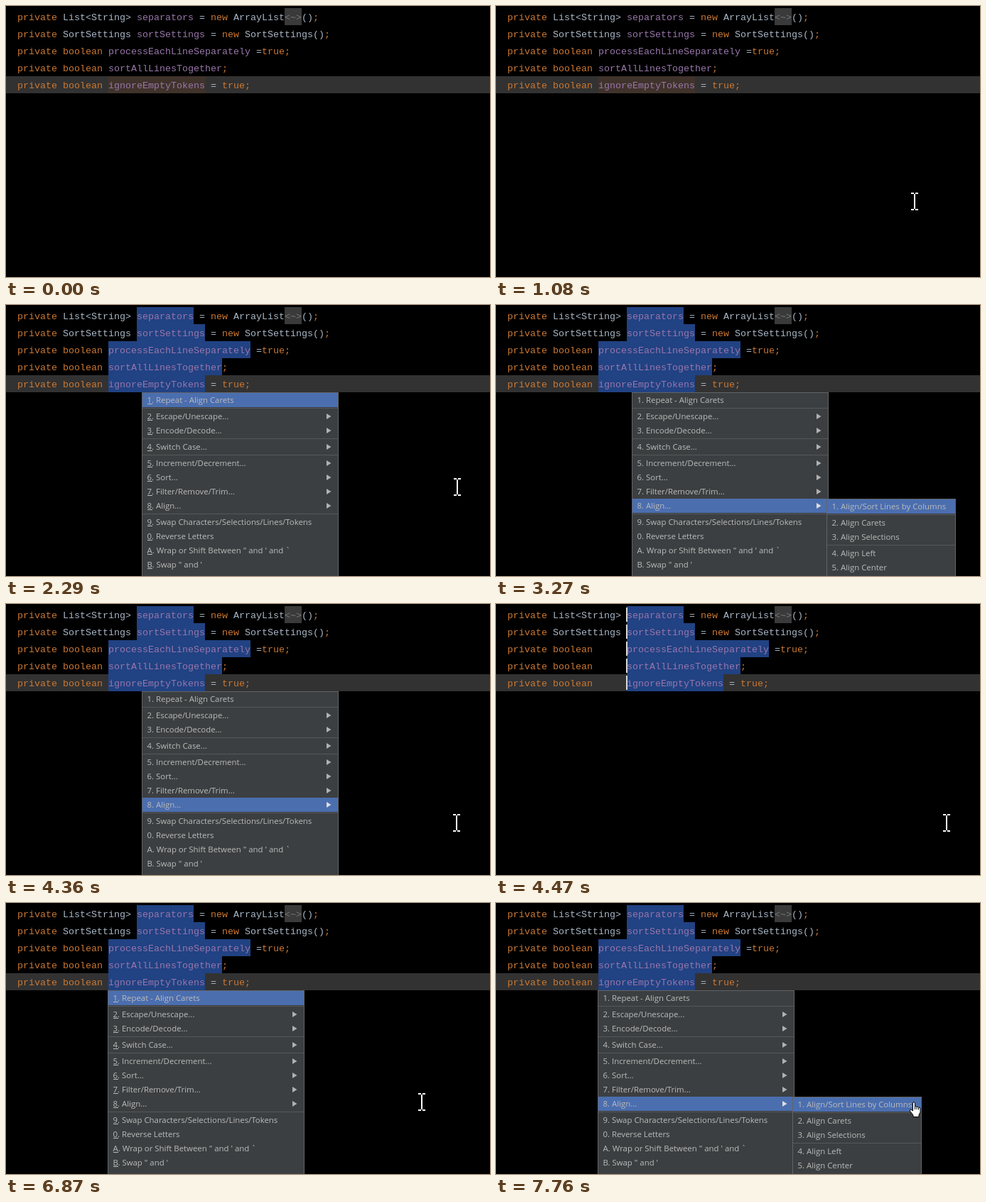
Recreate the animation shown at these times as an HTML page with a canvas. Size 681 px wide and 382 px high, loop 8000 ms.

```html
<!DOCTYPE html>
<html lang="en">
<head>
<meta charset="utf-8">
<title>Align carets</title>
<style>
  html, body { margin: 0; width: 100%; height: 100%; overflow: hidden; background: #000; }
  canvas { display: block; width: 681px; height: 382px; }
</style>
</head>
<body>
<canvas id="stage" width="681" height="382"></canvas>
<script>
const ctx = document.getElementById('stage').getContext('2d');
const LOOP = 8000;
const CHAR = 8, LEFT = 16, ROW = 24, TOP = 3;
const CODE_FONT = '13.333px "Liberation Mono", "Courier New", monospace';
const MENU_FONT = '11.4px "Open Sans", "Noto Sans", sans-serif';
const KEYWORD = '#cc7832', FIELD = '#9876aa', PLAIN = '#a9b7c6', FOLD = '#787878';
const MENU_BG = '#3c3f41', MENU_EDGE = '#616365', MENU_LINE = '#555758', FOCUS = '#4b6eaf';

// Each line: text before the field, the field, text after it
const k = text => [text, KEYWORD];
const p = text => [text, PLAIN];
const lines = [
  { head: [k('private '), p('List<String> ')], field: 'separators',
    tail: [p(' = '), k('new '), p('ArrayList'), ['<~>', FOLD], p('()'), k(';')] },
  { head: [k('private '), p('SortSettings ')], field: 'sortSettings',
    tail: [p(' = '), k('new '), p('SortSettings()'), k(';')] },
  { head: [k('private boolean ')], field: 'processEachLineSeparately',
    tail: [p(' ='), k('true;')] },
  { head: [k('private boolean ')], field: 'sortAllLinesTogether', tail: [k(';')] },
  { head: [k('private boolean ')], field: 'ignoreEmptyTokens',
    tail: [p(' = '), k('true;')] }
];

// '-' is a separator, a trailing '>' marks a submenu
const mainItems = [
  '1. Repeat - Align Carets', '-',
  '2. Escape/Unescape...>', '3. Encode/Decode...>', '-',
  '4. Switch Case...>', '-',
  '5. Increment/Decrement...>', '6. Sort...>', '7. Filter/Remove/Trim...>', '8. Align...>', '-',
  '9. Swap Characters/Selections/Lines/Tokens', '0. Reverse Letters',
  'A. Wrap or Shift Between " and \' and `', 'B. Swap " and \'',
  'C. Switch File Path Separators: Desktop <-> MAIN'
];
const subItems = [
  '1. Align/Sort Lines by Columns', '-',
  '2. Align Carets', '3. Align Selections', '-',
  '4. Align Left', '5. Align Center'
];

// Pointer steps: time, shape, x, y
const pointer = [
  [0, 'none', 0, 0],
  [870, 'beam', 641, 293], [980, 'beam', 606, 282], [1080, 'beam', 589, 276],
  [1620, 'beam', 591, 276],
  [1830, 'beam', 600, 273], [1950, 'beam', 616, 266], [2060, 'beam', 629, 260], [2170, 'beam', 635, 257],
  [3040, 'none', 0, 0],
  [3370, 'hand', 644, 282], [3490, 'hand', 654, 287], [3600, 'hand', 651, 295],
  [3720, 'hand', 641, 304], [3830, 'hand', 634, 309],
  [4360, 'beam', 634, 309], [5020, 'beam', 604, 290], [5120, 'beam', 585, 281],
  [7320, 'none', 0, 0], [7760, 'hand', 585, 281]
];

const within = (t, from, to) => t >= from && t < to;

function box(x, y, w, h, color) {
  ctx.fillStyle = color;
  ctx.fillRect(x, y, w, h);
}

function write(text, x, y, color) {
  ctx.fillStyle = color;
  ctx.fillText(text, x, y);
}

function drawCode(t) {
  const selected = t >= 1310;
  const aligned = within(t, 4470, 5670);
  const midCarets = within(t, 650, 1080) || within(t, 1310, 1830);
  const startCarets = within(t, 4470, 6870);
  ctx.font = CODE_FONT;
  box(0, TOP + 4 * ROW, 681, ROW, '#323232');

  lines.forEach((line, i) => {
    const top = TOP + i * ROW;
    let x = LEFT;
    const run = ([text, color]) => {
      const w = text.length * CHAR;
      if (color === FOLD) box(x, top, w, ROW, '#3a3a3a');
      write(text, x, top + 17, color);
      x += w;
    };
    line.head.forEach(run);
    if (aligned && i > 1) x += 5 * CHAR;
    const start = x, width = line.field.length * CHAR;
    if (selected) box(start, top, width, ROW, '#214283');
    else if (i === 4) box(start, top, width, ROW, '#40332b');
    run([line.field, FIELD]);
    line.tail.forEach(run);
    if (midCarets || startCarets) {
      const caret = startCarets ? start : LEFT + 22 * CHAR;
      box(caret - 1, top + 2, 2, 20, '#d8d8d8');
    }
  });
}

function drawArrow(x, y, color) {
  ctx.fillStyle = color;
  ctx.beginPath();
  ctx.moveTo(x, y - 4);
  ctx.lineTo(x + 6.5, y);
  ctx.lineTo(x, y + 4);
  ctx.fill();
}

function drawMenu(items, x, y, w, focus, underline) {
  box(x, y, w, 400, MENU_EDGE);
  box(x + 1, y + 1, w - 2, 400, MENU_BG);
  ctx.font = MENU_FONT;
  let top = y + 1;
  for (const item of items) {
    if (item === '-') {
      box(x + 1, top + 1, w - 2, 1, MENU_LINE);
      top += 3;
      continue;
    }
    const active = item[0] === focus;
    if (active) box(x + 1, top, w - 2, 20, FOCUS);
    write(item.replace(/>$/, ''), x + 7.5, top + 14, '#bbbbbb');
    if (underline) box(x + 8, top + 15, Math.round(ctx.measureText(item[0]).width), 1, '#bbbbbb');
    if (item.endsWith('>')) drawArrow(x + 260, top + 10, active ? '#dddddd' : '#afb1b3');
    top += 20;
  }
}

function drawMenus(t) {
  const first = within(t, 2290, 4470);
  if (!first && t < 6870) return;
  const x = first ? 191 : 143;
  const moved = t >= (first ? 3040 : 7640);
  drawMenu(mainItems, x, 123, 277, moved ? '8' : '1', !moved);
  if (first ? within(t, 3150, 4260) : moved) {
    let focus = '1';
    if (first) focus = t < 3270 ? '' : t < 3720 ? '1' : '2';
    drawMenu(subItems, x + 274, 273, 182, focus, false);
  }
}

function drawBeam(x, y) {
  box(x - 1, y - 11, 2, 21, '#fff');
  for (const edge of [y - 13, y + 10]) {
    box(x - 5, edge, 4, 2, '#fff');
    box(x + 1, edge, 4, 2, '#fff');
  }
}

const hand = new Path2D('M5 13V2.2Q5 .8 6.5 .8T8 2.2V6.8Q9.2 6 10.5 7.4Q12 6.8 13 8.2' +
  'Q15.5 7.8 15.5 10V15L13.5 18.5V21.5H5.5V19L1 13.2Q.4 11.2 2.4 11.2Z');
const fingers = new Path2D('M8 6.5V11M10.5 7.5V11M13 8.5V11.5');

function drawHand(x, y) {
  ctx.save();
  ctx.translate(x - 3.5, y - 1);
  ctx.fillStyle = '#fff';
  ctx.strokeStyle = '#000';
  ctx.fill(hand);
  ctx.stroke(hand);
  ctx.stroke(fingers);
  ctx.restore();
}

function drawPointer(t) {
  const [, shape, x, y] = pointer.filter(step => step[0] <= t).pop();
  if (shape === 'beam') drawBeam(x, y);
  if (shape === 'hand') drawHand(x, y);
}

function render(t) {
  box(0, 0, 681, 382, '#000');
  drawCode(t);
  drawMenus(t);
  drawPointer(t);
}

const began = performance.now();
function tick() {
  render((performance.now() - began) % LOOP);
  requestAnimationFrame(tick);
}
tick();
</script>
</body>
</html>
```
